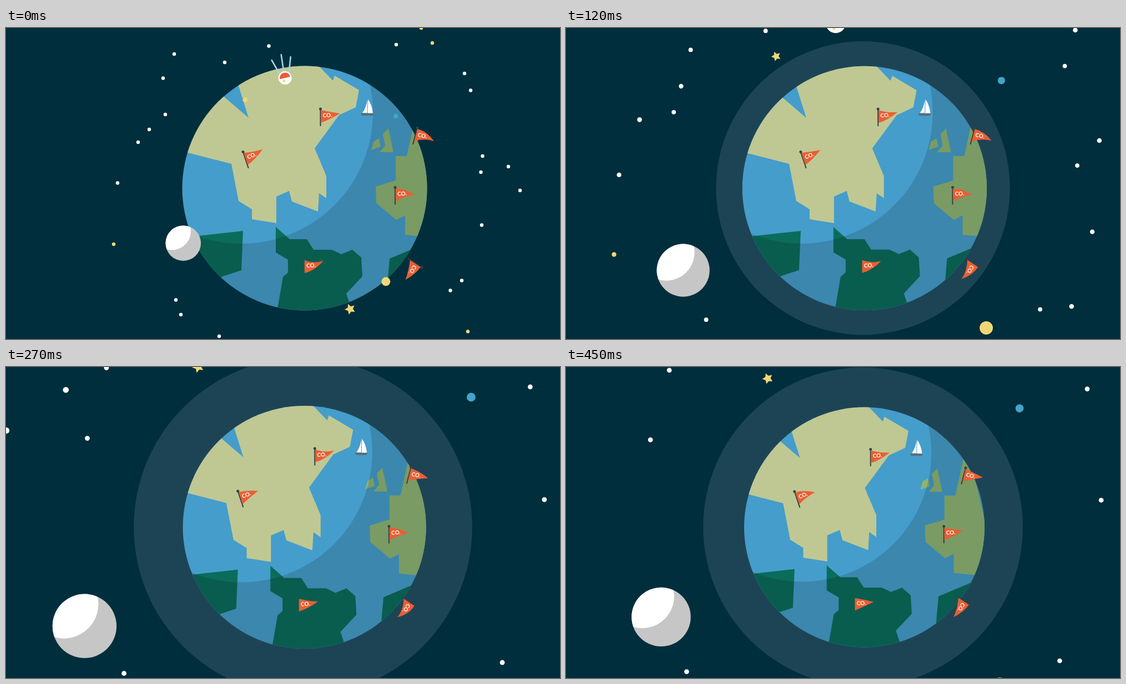
An HTML page with a canvas for the animation above (480 ms loop, 998 by 561 pixels).

```html
<!DOCTYPE html>
<html lang="en">
<head>
<meta charset="utf-8">
<title>Globe zoom</title>
<style>
  html, body { margin: 0; width: 100%; height: 100%; overflow: hidden; background: #002e3c; }
  canvas { display: block; width: 998px; height: 561px; }
</style>
</head>
<body>
<canvas id="stage" width="998" height="561"></canvas>
<script>
const ctx = document.getElementById('stage').getContext('2d');
const LOOP = 480, STEP = 30, TAU = Math.PI * 2;
const CX = 538, CY = 289, RADIUS = 220.5;
const SKY = '#002e3c', YELLOW = '#f0d776', WHITE = '#ffffff', ORANGE = '#e95f33';
const POLE = '#333f48', SAND = '#bfc893', GRASS = '#8eb473', FOREST = '#0b6c5b';

// Motion that starts at full speed, slows down and swings back
const swing = (t, width) => t / 60 * Math.exp(-((t / 60) ** 2) / width);
const zoom = t => .268 * swing(t, 51.5);
const drift = t => 1.02 * swing(t, 64);
const rush = t => .985 * t / 60;

// Stars fly away from one vanishing point, each layer at its own rate
const VANISH = { x: 553, y: 321 };
const starLayers = [
  { move: drift, rate: .113, color: WHITE, stars: [[303, 47], [394, 62], [703, 30], [283, 90.5],
    [258, 183], [837, 112.5], [855.5, 260], [800.5, 473.5], [306, 490.5], [384, 556]] },
  { move: rush, rate: .152, color: WHITE,
    stars: [[287, 156], [201, 279.5], [905, 250], [926, 293], [857, 355.5]] },
  { move: rush, rate: .17, color: WHITE,
    stars: [[473.5, 32.5], [238, 206], [826, 82], [858.5, 231], [821, 455.5], [315, 517]] },
  { move: rush, rate: .152, color: YELLOW, stars: [[194, 390], [768, 27], [748, 0], [832, 547.5]] }
];

// Corner points of each coast; parts outside the globe are clipped
const lands = [
  [SAND, '250,205 406,245 419,312 443,327 443,345 487,352 487,304 510,294 515,313 562,331 564,298 577,307 577,267 556,217 600,157 630,143 636,112 592,86 589,95 540,44 400,44 437,162 360,96'],
  [GRASS, '743,134 722,231 702,231 702,275 666,286 667,316 703,346 719,338 719,373 800,381'],
  [GRASS, '658,220 662,205 672,199 675,214'],
  [GRASS, '679,191 689,181 698,224 673,224 683,212'],
  [FOREST, '486,359 511,381 542,381 554,400 587,400 604,408 624,400 640,414 642,448 613,479 630,530 485,530 499,449 508,441 508,418 486,405'],
  [FOREST, '300,380 427,366 424,437 330,468'],
  [FOREST, '691,416 760,387 760,520 682,520']
].map(([color, coast]) => [color, coast.split(' ').map(point => point.split(','))]);

// Top of the pole, lean, resting height of the tip, and time of its lowest sag
const flags = [
  { x: 427, y: 223.5, lean: -.32, rest: 10, peak: 450, pole: 31 },
  { x: 566.5, y: 146, lean: 0, rest: 7, peak: 730, pole: 31 },
  { x: 701, y: 287.5, lean: 0, rest: 10.5, peak: 80, pole: 31 },
  { x: 741, y: 180, lean: .26, rest: 12.3, peak: 0, pole: 31 },
  { x: 537, y: 417, lean: 0, rest: 6, peak: 450, pole: 0 },
  { x: 749, y: 432, lean: 2.16, rest: 12.5, peak: 240, pole: 31 }
];

function disc(x, y, r, color) {
  ctx.fillStyle = color;
  ctx.beginPath();
  ctx.arc(x, y, r, 0, TAU);
  ctx.fill();
}

function polygon(points, color) {
  ctx.fillStyle = color;
  ctx.beginPath();
  for (const [x, y] of points) ctx.lineTo(x, y);
  ctx.fill();
}

function line(x1, y1, x2, y2, width, color) {
  ctx.strokeStyle = color;
  ctx.lineWidth = width;
  ctx.beginPath();
  ctx.moveTo(x1, y1);
  ctx.lineTo(x2, y2);
  ctx.stroke();
}

function fivePointStar(x, y, r) {
  const points = Array.from({ length: 10 }, (_, i) => {
    const a = i * TAU / 10 - TAU / 4 - .4, d = i % 2 ? r * .5 : r;
    return [x + d * Math.cos(a), y + d * Math.sin(a)];
  });
  polygon(points, YELLOW);
}

function drawStars(t) {
  for (const { move, rate, color, stars } of starLayers) {
    const grow = rate * move(t), turn = .02 * grow;
    for (const [x, y] of stars) {
      const dx = x - VANISH.x, dy = y - VANISH.y;
      disc(x + dx * grow, y + dy * grow + dx * turn, 3.2 * (1 + grow), color);
    }
  }
}

function drawFlag({ x, y, lean, rest, peak, pole }, t) {
  const tip = rest + 3.3 * Math.cos(TAU * (t - peak) / 900), bend = (tip - 9) * .6;
  ctx.save();
  ctx.translate(x, y);
  ctx.rotate(lean);
  if (pole) {
    line(0, 0, 0, pole, 2, POLE);
    disc(0, 0, 2.5, POLE);
  }
  ctx.fillStyle = ORANGE;
  ctx.beginPath();
  ctx.moveTo(.8, 2);
  ctx.quadraticCurveTo(18, 5 - bend, 35, tip);
  ctx.quadraticCurveTo(18, 18 - bend, .8, 25);
  ctx.fill();
  ctx.translate(12.5, 11.8);
  ctx.rotate(-.06);
  ctx.fillStyle = WHITE;
  ctx.fillText('CO.', 0, 0);
  ctx.restore();
}

function drawBoat() {
  polygon([[638.5, 154], [662.5, 154], [660, 158], [641.5, 158]], '#5f6b73');
  ctx.fillStyle = WHITE;
  ctx.beginPath();
  ctx.moveTo(651, 130);
  ctx.quadraticCurveTo(648, 146, 642, 153);
  ctx.lineTo(650.6, 153);
  ctx.moveTo(652, 128.5);
  ctx.quadraticCurveTo(659, 138, 661, 153.5);
  ctx.lineTo(651.6, 153.5);
  ctx.fill();
}

function drawGlobe(t, p) {
  const size = 1 - .018 * p * p, shift = -15 * p - 2 * p * p;
  ctx.save();
  ctx.translate(CX - .6 * p, CY);
  ctx.scale(size, size);
  ctx.translate(-CX, -CY);

  ctx.save();
  disc(CX, CY, RADIUS, '#459dcb');
  ctx.clip();
  ctx.save();
  ctx.translate(shift, 0);
  for (const [color, coast] of lands) polygon(coast, color);
  ctx.restore();
  ctx.fillStyle = 'rgba(0, 0, 0, .14)';
  ctx.beginPath();
  ctx.rect(300, 50, 480, 480);
  ctx.arc(424, 152, 237, 0, TAU);
  ctx.fill('evenodd');
  ctx.restore();

  ctx.translate(shift, 0);
  drawBoat();
  for (const flag of flags) drawFlag(flag, t);
  ctx.restore();
}

function drawMoon(x, y, r) {
  ctx.save();
  disc(x, y, r, '#c6c6c6');
  ctx.clip();
  disc(x - .65 * r, y - .69 * r, 1.08 * r, WHITE);
  ctx.restore();
}

function drawProbe(x, y) {
  ctx.save();
  ctx.translate(x, y);
  ctx.lineCap = 'round';
  for (const i of [-1, 0, 1])
    line(17 * i - 7, 7 * i * i - 3 * i - 42, 9 * i - 2, -9, 2.6, '#9fd4f5');
  disc(0, 0, 12, WHITE);
  ctx.rotate(-.24);
  ctx.fillStyle = ORANGE;
  ctx.beginPath();
  ctx.arc(0, 0, 9.6, Math.PI, TAU);
  ctx.fill();
  disc(-3.2, 5, 2.3, YELLOW);
  ctx.restore();
}

function drawOrbit(t, p) {
  const size = 1 + zoom(t);
  ctx.save();
  ctx.translate(CX + 1.5 * p, CY);
  ctx.rotate(.0115 * p * p);
  ctx.scale(size, size);
  drawProbe(-35.3, -199);
  fivePointStar(-107, -159, 6);
  disc(164.3, -130, 4.4, '#43a3cb');
  disc(146.3, 168.3, 8, YELLOW);
  fivePointStar(82, 218, 10);
  drawMoon(-218.7, 99.2, 31.8);
  ctx.restore();
}

function draw(t) {
  const p = t / 450, z = zoom(t);
  ctx.fillStyle = SKY;
  ctx.fillRect(0, 0, 998, 561);
  ctx.font = '700 10px Lato, sans-serif';
  ctx.textAlign = 'center';
  ctx.textBaseline = 'middle';
  drawStars(t);
  const halo = 192 + 159 * z - 25 * z * z;
  if (halo > RADIUS - 4) disc(535, 288.7, halo, '#1d4455');
  drawGlobe(t, p);
  drawOrbit(t, p);
}

function tick() {
  const t = performance.now() % LOOP;
  draw(Math.floor(t / STEP) * STEP);
  requestAnimationFrame(tick);
}
tick();
</script>
</body>
</html>
```
